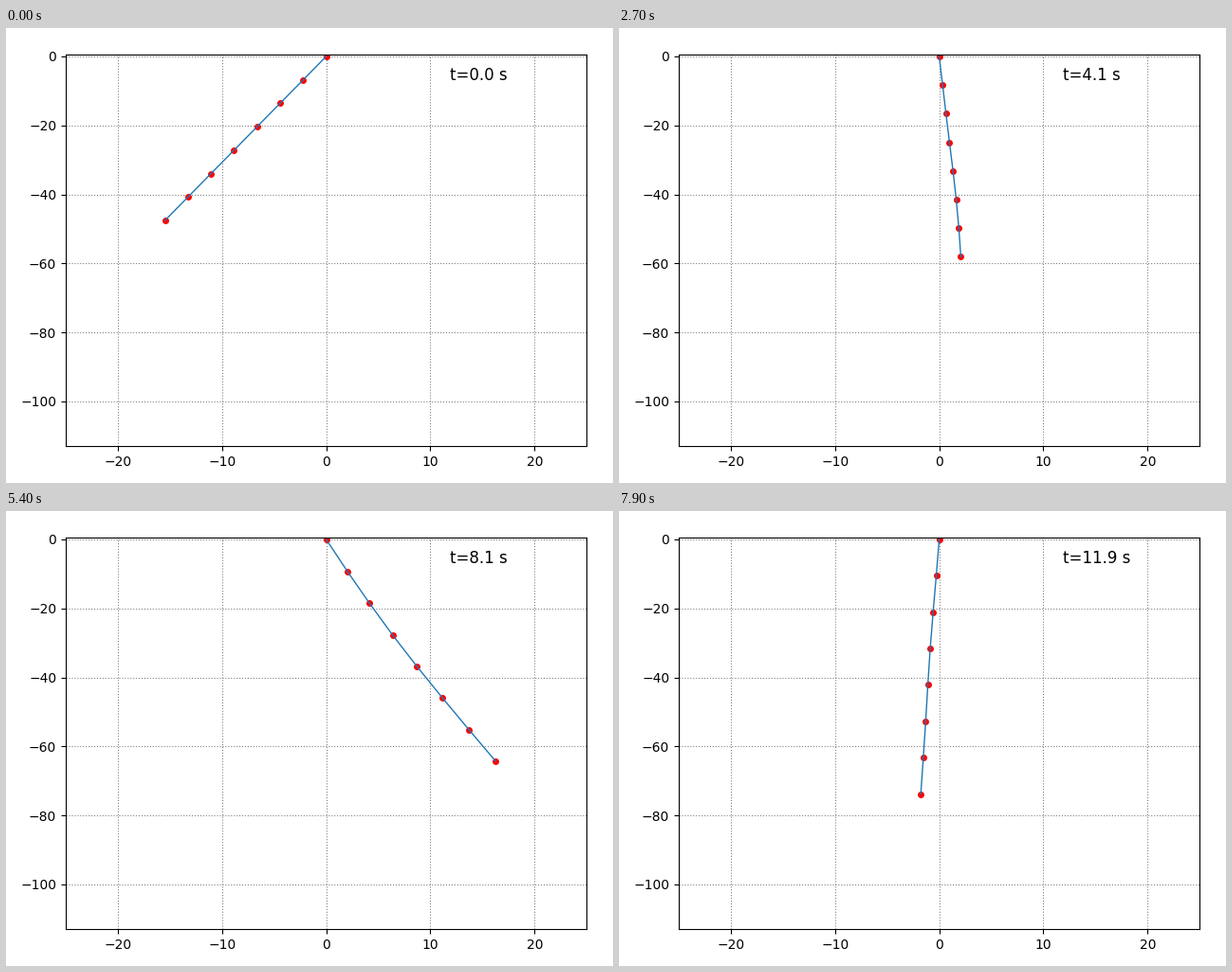
Animation of 640x480 px, one loop 8000 ms. Source, as a matplotlib script:

```python
import numpy as np
import matplotlib.pyplot as plt
from matplotlib.animation import FuncAnimation

# Heavy load on a rope that is paid out at constant speed
N = 7                 # links
FRAMES = 80
DT = 0.1509           # model seconds per frame
SUB = 10              # integration steps per frame
G, L0, V = 9.81, 50.0, 2.0
DENSITY = 0.0064      # rope mass per length, load = 1
S = np.arange(N + 1) / N


def length(t):
    return L0 + V * t


def swing(t):
    """Sideways position of the load on the growing pendulum."""
    s = np.sqrt(length(t))
    return 5.84 * np.sqrt(s) * np.sin(3.22 * (s - 7.5854))


def acceleration(x, v, t):
    """Sideways acceleration of the inner nodes of the rope."""
    full = length(t)
    l = full / N
    tension = G * (1 + DENSITY * l * (N - np.arange(N) - 0.5))
    pull = np.diff(tension * np.diff(x)) / (DENSITY * l ** 2)
    turn = np.gradient(v - V / full * x, S)[1:-1]
    return pull - 2 * V / full * (1 - S[1:-1]) * turn


def simulate():
    """Sideways node positions, one row per frame."""
    h = DT / SUB
    x, last = S * swing(0), S * swing(-h)
    rows = []
    for step in range(FRAMES * SUB):
        t = step * h
        if step % SUB == 0:
            rows.append(x)
        new = 2 * x - last
        new[1:-1] += h ** 2 * acceleration(x, (x - last) / h, t)
        new[-1] = swing(t + h)
        x, last = new, x
    return np.array(rows)


X = simulate()


def nodes(k):
    l = length(k * DT) / N
    drop = np.sqrt(l ** 2 - np.diff(X[k]) ** 2)
    return X[k], -np.concatenate([[0], np.cumsum(drop)])


fig = plt.figure(figsize=(6.4, 4.8), dpi=100)
ax = fig.add_axes([62.9 / 640, 38.75 / 480, 549.4 / 640, 413.1 / 480])
ax.set_xlim(-25, 25)
ax.set_ylim(-113, 0.5)
ax.set_xticks(range(-20, 21, 10))
ax.set_yticks(range(-100, 1, 20))
ax.grid(color="gray", linestyle=":")

beads, = ax.plot([], [], "o", color="red", markersize=4)
rope, = ax.plot([], [], lw=1, color="C0")
clock = ax.text(11.88, -7, "", fontsize=12)


def draw(k):
    x, y = nodes(k)
    beads.set_data(x, y)
    rope.set_data(x, y)
    clock.set_text(f"t={k * DT:.1f} s")
    return beads, rope, clock


anim = FuncAnimation(fig, draw, frames=FRAMES, interval=100,
                     repeat=True, repeat_delay=0)
plt.show()
```
